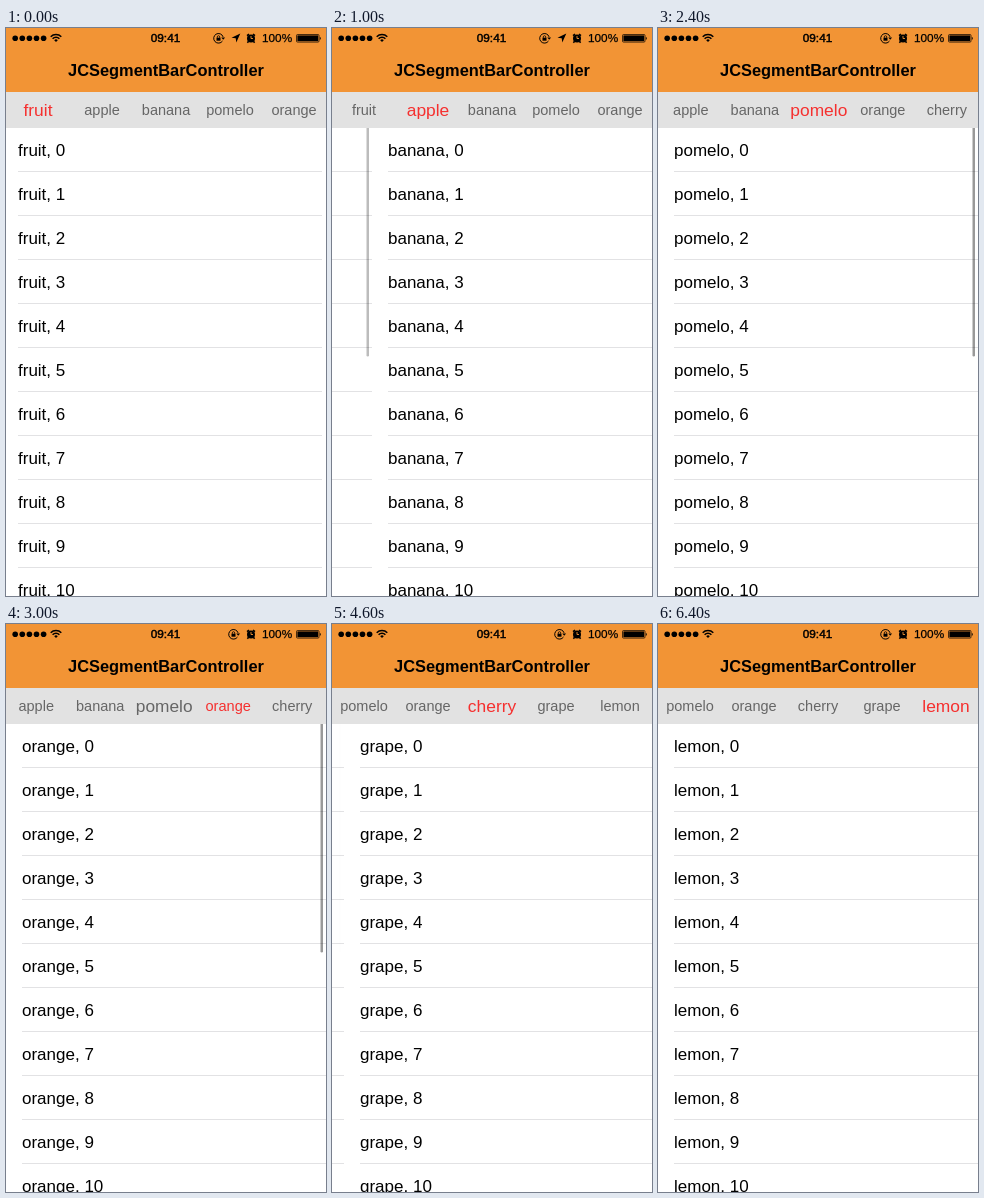
Recreate the animation shown at these times as an HTML page. Size 320 by 568 pixels, loop 6600 ms.

```html
<!DOCTYPE html>
<html lang="en">
<head>
<meta charset="utf-8">
<title>Segment bar</title>
<style>
html, body { margin: 0; width: 100%; height: 100%; overflow: hidden; background: #fff; }
svg { display: block; width: 320px; height: 568px; font-family: "Liberation Sans", Arial, sans-serif; }
.tab { font-size: 14.5px; text-anchor: middle; }
.row { font-size: 17px; }
.status { font-size: 11.8px; stroke: #000; stroke-width: .25; }
</style>
</head>
<body>
<svg viewBox="0 0 320 568">
  <rect width="320" height="568" fill="#fff"/>
  <g id="pages"></g>
  <rect width="320" height="64" fill="#f29435"/>
  <rect y="64" width="320" height="36" fill="#e2e2e2"/>
  <g id="tabs"></g>
  <text x="160" y="48" font-size="16.4" font-weight="bold" text-anchor="middle">JCSegmentBarController</text>

  <g id="signal"></g>
  <g fill="none" stroke="#000" stroke-width="1.5">
    <path d="M44.7 8.8A7.4 7.4 0 0 1 55.3 8.8"/>
    <path d="M46.6 10.8A4.7 4.7 0 0 1 53.4 10.8"/>
  </g>
  <path d="M50 14L48.2 12.2A2.6 2.6 0 0 1 51.8 12.2Z"/>
  <text class="status" x="159.5" y="14.3" text-anchor="middle" style="stroke-width:.45">09:41</text>
  <g id="lock">
    <path d="M4 2.7A4.8 4.8 0 1 1 4.6 -1.4" fill="none" stroke="#000"/>
    <path d="M2.8 -.9H6.6L4.7 1.5Z"/>
    <rect x="-2" y="-.6" width="4" height="3"/>
    <path d="M-1.2 -.4V-1.4A1.2 1.2 0 0 1 1.2 -1.4V-.4" fill="none" stroke="#000" stroke-width=".8"/>
  </g>
  <path id="arrow" d="M234.3 5.6L230.3 14.4L229.7 10.3L225.5 9.7Z"/>
  <g>
    <circle cx="245" cy="10.4" r="4"/>
    <path d="M241 7.6L243 6M249 7.6L247 6M242.6 13.2L241.4 14.8M247.4 13.2L248.6 14.8" stroke="#000" stroke-width="1.5"/>
    <path d="M245 8V10.5H247" fill="none" stroke="#f29435" stroke-width=".9"/>
  </g>
  <text class="status" x="256" y="14.3">100%</text>
  <rect x="290.5" y="6.5" width="22.5" height="7.6" rx="1" fill="none" stroke="#000" stroke-width=".7"/>
  <rect x="291.4" y="7.4" width="20.7" height="5.8"/>
  <path d="M313.8 8.7Q315.8 10.3 313.8 11.9Z"/>
</svg>
<script>
const NAMES = ["fruit", "apple", "banana", "pomelo", "orange", "cherry", "grape", "lemon"];
const ARRIVE = [471, 1146, 2130, 2980, 3823, 4680, 5530]; // when each next page settles
const LOOP = 6600, STEP = 200;
const WIDTH = 320, TAB = 64, ROW = 44;
const SPEED_UP = 163, SLOW_DOWN = 340, SWIPE = SPEED_UP + SLOW_DOWN;
const SELECT = 300;

const $ = id => document.getElementById(id);
const clamp = (v, lo = 0, hi = 1) => Math.min(hi, Math.max(lo, v));
const smooth = u => u * u * (3 - 2 * u);
const maxScroll = NAMES.length * TAB - WIDTH;
const scrollFor = i => clamp((i - 2) * TAB, 0, maxScroll);

function add(parent, tag, attrs, text) {
  const el = document.createElementNS("http://www.w3.org/2000/svg", tag);
  for (const key in attrs) el.setAttribute(key, attrs[key]);
  if (text) el.textContent = text;
  return parent.appendChild(el);
}

for (let i = 0; i < 5; i++) add($("signal"), "circle", { cx: 9.2 + i * 7.1, cy: 10.2, r: 2.8 });

const pages = NAMES.map(name => {
  const page = add($("pages"), "g", {});
  for (let i = 0; i < 11; i++) {
    const y = 100 + i * ROW;
    add(page, "text", { class: "row", x: 16, y: y + 28 }, `${name}, ${i}`);
    add(page, "rect", { x: 16, y: y + ROW - 1, width: WIDTH - 16, height: 1, fill: "#e2e2e4" });
  }
  const bar = add(page, "rect", { x: 314.5, y: 96, width: 2.5, height: 232.5, rx: 1.25 });
  return { page, bar };
});

const tabs = NAMES.map(name => add($("tabs"), "text", { class: "tab", y: 4.8 }, name));

// Share of one swipe done at s ms after the finger starts.
function swipe(s) {
  s = clamp(s, 0, SWIPE);
  if (s < SPEED_UP) return s * s / (SPEED_UP * SWIPE);
  const left = SWIPE - s;
  return 1 - left * left / (SLOW_DOWN * SWIPE);
}

function flash(age) {
  if (age < -40) return 0;
  return 0.4 * clamp((780 - age) / 380);
}

function draw(t) {
  const travel = ARRIVE.reduce((sum, at) => sum + swipe(t - at + SWIPE), 0);
  const offset = Math.round(travel * WIDTH);
  pages.forEach(({ page, bar }, i) => {
    const x = i * WIDTH - offset;
    page.setAttribute("transform", `translate(${x} 0)`);
    page.setAttribute("display", Math.abs(x) < WIDTH ? "inline" : "none");
    bar.setAttribute("opacity", i ? flash(t - ARRIVE[i - 1]) : 0);
  });

  const now = ARRIVE.filter(at => t >= at).length;
  const mix = now ? smooth(clamp((t - ARRIVE[now - 1] + 10) / SELECT)) : 1;
  const from = scrollFor(Math.max(0, now - 1));
  const scroll = from + (scrollFor(now) - from) * mix;
  tabs.forEach((tab, i) => {
    const grow = i === now ? mix : i === now - 1 ? 1 - mix : 0;
    const x = (i + 0.5) * TAB - scroll;
    tab.setAttribute("transform", `translate(${x} 82.5) scale(${1 + 0.2 * grow})`);
    tab.setAttribute("fill", i === now ? "#f5302f" : "#666");
  });

  const located = t < 1600;
  $("arrow").setAttribute("display", located ? "inline" : "none");
  $("lock").setAttribute("transform", `translate(${located ? 212.5 : 227.5} 10.3)`);
}

const start = performance.now();
function tick() {
  const t = (performance.now() - start) % LOOP;
  draw(Math.floor(t / STEP) * STEP);
  requestAnimationFrame(tick);
}
tick();
</script>
</body>
</html>
```
